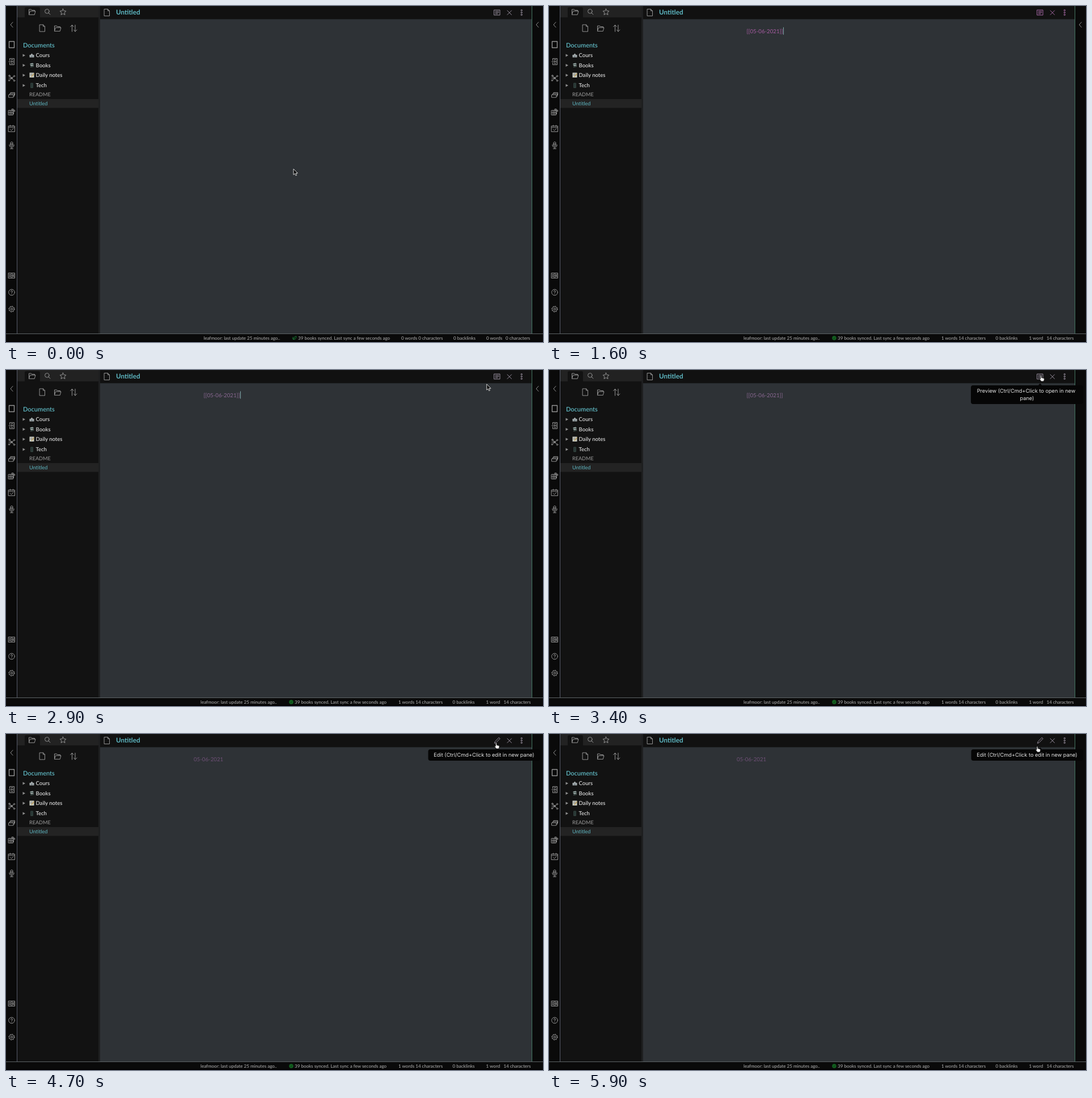
Animation, 947 px wide and 592 px high, one loop 6000 ms. Source, as an HTML page:

```html
<!DOCTYPE html>
<html lang="en">
<head>
<meta charset="utf-8">
<title>Daily note link</title>
<style>
  html, body { margin: 0; width: 100%; height: 100%; overflow: hidden; background: #0a0a0a; }
  svg { display: block; }
  text { font-family: Lato, "Open Sans", sans-serif; white-space: pre; text-rendering: geometricPrecision; }
  .icon { fill: none; stroke: #929292; stroke-width: 1; stroke-linejoin: round; stroke-linecap: round; }
  .teal { fill: #5fb9c4; }
  .folder { font-size: 9.5px; font-weight: 600; fill: #d6d6d6; }
  .file { font-size: 9.1px; }
  .status text { font-size: 8.05px; fill: #b4b4b4; }
  .tip text { font: 9.2px Inter, "Liberation Sans", sans-serif; fill: #e6e6e6; text-anchor: middle; }
  .tip { fill: #060606; }
  #note { font-size: 9.7px; }
  .row { font-size: 10.5px; }
  .hint { font-size: 8.5px; fill: #64686c; }
</style>
</head>
<body>
<svg width="947" height="592" viewBox="0 0 947 592">
  <defs>
    <path id="folder" d="M-5.5 4.5V-4.5H-1.5L-.3-3H4.5V-1.5M-5.5 4.5L-3.5-1.5H6L4.3 4.5Z"/>
    <path id="page" d="M-4.5-6H1.5L4.5-3V6H-4.5ZM1.5-6V-3H4.5"/>
    <path id="fold" d="M0-2.5L4.5 0L0 2.5Z" fill="#8d8d8d"/>
    <path id="notch" d="M862.5 27.5L866 23.5L869.5 27.5Z"/>
    <filter id="shade" x="-30%" y="-40%" width="160%" height="210%">
      <feDropShadow dx="0" dy="7" stdDeviation="7" flood-color="#000" flood-opacity=".3"/>
    </filter>
  </defs>

  <!-- panels -->
  <rect width="947" height="592" fill="#0a0a0a"/>
  <rect x="20" width="144" height="577" fill="#121212"/>
  <rect x="20" width="143" height="20" fill="#222"/>
  <path d="M33 20V5Q33 2 36 2H57Q60 2 60 5V20Z" fill="#121212"/>
  <rect x="163" width="3" height="577" fill="#1e1f20"/>
  <rect x="166" width="761" height="23" fill="#111"/>
  <rect x="166" y="23" width="761" height="554" fill="#2e3236"/>
  <rect x="166" y="23" width="761" height="1" fill="#24292b"/>
  <rect x="19" width="1" height="577" fill="#565a68"/>
  <rect x="927" width="1" height="577" fill="#437460"/>
  <rect y="577" width="947" height="1" fill="#5c6264"/>
  <rect y="590" width="947" height="2" fill="#020103"/>

  <!-- ribbons -->
  <g class="icon">
    <path d="M12 28.5L8 33L12 37.5"/>
    <rect x="5.5" y="62.5" width="9" height="11" stroke-width="1.4"/>
    <path transform="translate(10 98)" d="M-3.5-2V-5.5H4.5V5.5H-3.5V2M-5 0H1M-1-2L1 0L-1 2M-1-3.5H2.5M-1 3.5H2.5M2.5-1.5V1.5"/>
    <g transform="translate(10 127)">
      <path d="M-3.5-3.5L0 0L4-3M0 0L-4 4M0 0L4 4M0 0H-5"/>
      <circle cx="-4" cy="-4" r="1.3"/><circle cx="4.5" cy="-3.5" r="1.2"/>
      <circle cx="-4.5" cy="4" r="1.2"/><circle cx="4.5" cy="4.5" r="1.3"/><circle r="1.3"/>
    </g>
    <path d="M5 156.5H13V161H5ZM6.5 156V154.5H14.5V159H13.5M8 154V152.5H15.5V157H15"/>
    <path d="M4.5 184H12.5V192H4.5ZM4.5 188H12.5M7.2 184V192M9.9 184V192M10.5 181.5H13V183.5H10.5ZM13.5 183.5H15.5V186H13.5ZM13.5 188V190"/>
    <path d="M4.5 211.5H15.5V221.5H4.5ZM4.5 214H15.5M7.5 210V212M12.5 210V212M7.5 217.5L9.5 219.5L13 215.8"/>
    <path d="M8 240.5Q10 238 12 240.5V246Q10 248.5 8 246ZM6 244.5V246Q6.5 249 10 249T14 246V244.5M10 249V251.5M7.5 251.5H12.5M8.5 242.5H11.5M8.5 244.5H11.5"/>
    <path d="M4.5 470.5H15.5V479.5H4.5ZM6 472.5V474M6 476V477.5M14 472.5V474M14 476V477.5"/>
    <circle cx="10" cy="475" r="3"/><circle cx="10" cy="475" r="1"/>
    <circle cx="10" cy="504.5" r="5.3"/>
    <path d="M8.5 503Q8.7 501.5 10 501.5T11.5 503Q11.5 504 10 505V505.7M10 507.3V507.4"/>
    <circle cx="10" cy="534" r="4.3"/><circle cx="10" cy="534" r="1.7"/>
    <circle cx="10" cy="534" r="5.2" stroke-dasharray="1.8 2.28" stroke-linecap="butt"/>
    <path d="M939 28.5L935 33L939 37.5"/>
  </g>

  <!-- file pane -->
  <g class="icon">
    <use href="#folder" x="46" y="10.5"/>
    <circle cx="72.3" cy="9.3" r="3.7"/><path d="M75 12L78 15"/>
    <path d="M100.5 5L102.1 8.6L106 9L103.1 11.6L104 15.5L100.5 13.5L97 15.5L97.9 11.6L95 9L98.9 8.6Z"/>
    <use href="#page" x="64" y="39"/>
    <use href="#folder" x="91" y="39.5"/>
    <path d="M116.5 45V33.5M113.5 36.5L116.5 33.5L119.5 36.5M122 33.5V45M119.5 42L122 45L125 42"/>
    <use href="#page" x="178" y="11.5"/>
  </g>
  <rect x="20" y="164" width="143" height="15.5" fill="#232323"/>
  <text x="30" y="72.8" class="teal" font-size="11" font-weight="600">Documents</text>
  <g class="folder">
    <use href="#fold" x="29.5" y="87"/><text x="52.5" y="90">Cours</text>
    <use href="#fold" x="29.5" y="104.5"/><text x="52.5" y="107.6">Books</text>
    <use href="#fold" x="29.5" y="122"/><text x="52.5" y="125.3">Daily notes</text>
    <use href="#fold" x="29.5" y="140"/><text x="52.5" y="143.2">Tech</text>
  </g>
  <path d="M41.5 90.5V86H43.5L45.5 83.5L47.5 86H49.5V90.5Z" fill="#a9b0b2"/>
  <path d="M43 88H44M47 88H48M45.5 87.5V90.5" stroke="#4b5a60"/>
  <path d="M42 101.5L47 100.5L49 102L44 103ZM42.5 104L48 103.5L49 105L44 106Z" fill="#a8b5b4"/>
  <path d="M42 103.3L48.5 102.7M43 107.5L49 106.5" stroke="#567069"/>
  <rect x="41.5" y="117.5" width="8" height="8.5" fill="#c6c9bf"/>
  <path d="M43 120H47M43 122H46" stroke="#888"/><path d="M45 124.5L49.5 119" stroke="#b9974e" stroke-width="1.3"/>
  <rect x="43" y="135.5" width="5" height="9" rx="1" fill="#30413d"/>
  <path d="M44 138H47M44 141H47" stroke="#1c2526"/>
  <text x="41" y="159.2" class="file" fill="#9c9c9c">README</text>
  <text x="41" y="175.2" class="file teal">Untitled</text>
  <text x="194" y="14.8" class="teal" font-size="11.7" font-weight="700">Untitled</text>

  <!-- pane actions -->
  <g class="icon" id="actions">
    <path id="preview" d="M861 7H871V16H861ZM863 9.3H869M863 11.5H869M863 13.7H867"/>
    <path id="pencil" d="M861.5 16L862.5 13L869.3 6.3L871.2 8.2L864.5 15Z"/>
    <path d="M884 8L891.5 15.5M891.5 8L884 15.5"/>
    <circle cx="909.2" cy="7.6" r="1.2"/><circle cx="909.2" cy="11.5" r="1.2"/><circle cx="909.2" cy="15.4" r="1.2"/>
  </g>

  <!-- editor -->
  <text id="note" y="47.6"></text>
  <rect id="caret" y="37.5" width="1" height="13" fill="#83a9ae"/>
  <g id="popup">
    <rect id="box" x=".5" y="52.5" width="126" fill="#2e3236" stroke="#505558" filter="url(#shade)"/>
    <rect x="1" y="53" width="125" height="21.5" fill="#121212"/>
    <text class="row teal" x="7.5" y="66.8"></text>
    <text class="row" fill="#aaa" x="7.5" y="88.8"></text>
    <text class="row" fill="#aaa" x="7.5" y="110.8"></text>
    <text id="hint" class="hint" x="13.5"><tspan font-weight="700" fill="#85898c">Shift</tspan> Keep text as alias</text>
  </g>

  <g class="status" id="status">
    <text y="588">leafmoor: last update 25 minutes ago..</text>
    <text y="588">39 books synced. Last sync a few seconds ago</text>
    <text y="588"></text>
    <text y="588">0 backlinks</text>
    <text y="588"></text>
    <text y="588"></text>
  </g>
  <g id="sync">
    <path id="leaf" d="M-2.5 2Q-4-1-2-2M-2 2.5Q3 3.5 3.5-3Q-1-3-2 2.5L1-.5" fill="none" stroke="#16742f"/>
    <g id="disc"><circle r="3.8" fill="#12601f"/><path d="M-1.7 0L-.4 1.4L1.9-1.4" fill="none" stroke="#0a3513" stroke-width=".9"/></g>
  </g>

  <g class="tip" id="previewTip">
    <use href="#notch"/>
    <rect x="744" y="27" width="198" height="33" rx="4"/>
    <text x="841.5" y="40.3">Preview (Ctrl/Cmd+Click to open in new</text>
    <text x="843" y="53.3">pane)</text>
  </g>
  <g class="tip" id="editTip">
    <use href="#notch"/>
    <rect x="744.5" y="27" width="197.5" height="20" rx="4"/>
    <text x="843" y="40.3">Edit (Ctrl/Cmd+Click to edit in new pane)</text>
  </g>

  <g id="mouse" stroke-linejoin="round">
    <path id="arrow" d="M0 0V10.3L2.4 8.2L4 11.8L5.7 11L4.2 7.5H7.3Z" fill="#0c0c0c" stroke="#e8e8e8" stroke-width=".9"/>
    <path id="hand" d="M-1 1Q0-.6 1 1V4L5 5Q6 5.6 5.6 8L4.6 10.5H.2L-2.6 6.6Q-2.4 5.3-1 6Z" fill="#f2f2f2" stroke="#111" stroke-width=".8"/>
  </g>
</svg>
<script>
  const LOOP = 6000, STEP = 100;
  const PICK = 1600, CLICK = 3700, BLINK = 530;
  const NOTE_X = 348.5;
  const KEYS = [300, 500, 600, 700, 800, 1000];
  const DAYS = ['Today', 'Tomorrow', 'Yesterday'];
  const LINK = '[[05-06-2021]]';

  // Status layout: x of the six labels, then of the sync icon.
  const LAYOUT = {
    empty: [348.5, 515, 697, 789, 847, 881, 508.5],
    short: [352, 518, 700.5, 792, 851, 881, 512],
    long: [343, 509, 692, 787.5, 846.5, 877.5, 503]
  };
  // Pointer path: time, x, y.
  const PATH = [[0, 507, 287], [2300, 507, 287], [3000, 867.7, 9.5], [4500, 867.7, 9.5], [4900, 861, 21.5], [LOOP, 861, 21.5]];

  const $ = id => document.getElementById(id);
  const labels = [...$('status').children];
  const rows = [...document.querySelectorAll('.row')];
  const show = (id, on) => $(id).setAttribute('visibility', on ? 'visible' : 'hidden');
  const move = (id, x, y) => $(id).setAttribute('transform', `translate(${x} ${y})`);
  const within = (t, from, to) => t >= from && t < to;

  function pointerAt(t) {
    const i = PATH.findIndex(p => p[0] > t);
    const [t0, x0, y0] = PATH[i - 1], [t1, x1, y1] = PATH[i];
    const u = (t - t0) / (t1 - t0), k = u * u * (3 - 2 * u);
    return [x0 + (x1 - x0) * k, y0 + (y1 - y0) * k];
  }

  function noteColor(t) {
    if (t < PICK) return '#55acb8';
    if (t < CLICK) return t < 2900 ? '#a75ca2' : '#8a6892';
    return within(t, 4900, 5700) ? '#84487b' : '#6f5077';
  }

  function drawNote(t, typed) {
    const read = t >= CLICK, linked = t >= PICK;
    const note = $('note');
    note.textContent = read ? LINK.slice(2, -2) : linked ? LINK : '@today'.slice(0, typed);
    note.setAttribute('x', read ? 331 : NOTE_X);
    note.setAttribute('fill', noteColor(t));
    const end = Math.ceil(NOTE_X + (typed ? note.getComputedTextLength() : 0));
    $('caret').setAttribute('x', end);
    show('caret', typed && !read && (!linked || Math.floor((t - PICK) / BLINK) % 2 === 0));
    return end;
  }

  function drawPopup(x, typed, open) {
    $('popup').setAttribute('display', open ? 'inline' : 'none');
    if (!open) return;
    const query = 'today'.slice(0, typed - 1);
    const found = DAYS.filter(d => d.toLowerCase().startsWith(query));
    rows.forEach((r, i) => r.textContent = found[i] || '');
    const extra = 22 * (found.length - 1);
    $('box').setAttribute('height', 50.5 + extra);
    $('hint').setAttribute('y', 96.3 + extra);
    move('popup', x, 0);
  }

  function drawStatus(chars) {
    const xs = LAYOUT[chars > 9 ? 'long' : chars ? 'short' : 'empty'];
    const words = chars > 1 ? 1 : 0;
    labels.forEach((l, i) => l.setAttribute('x', xs[i]));
    labels[2].textContent = `${words} words ${chars} characters`;
    labels[4].textContent = words ? '1 word' : '0 words';
    labels[5].textContent = `${chars} characters`;
    move('sync', xs[6], 585);
    show('leaf', chars < 10);
    show('disc', chars > 9);
  }

  function draw(t) {
    const typed = KEYS.filter(k => k <= t).length;
    const end = drawNote(t, typed);
    drawPopup(end, typed, typed > 0 && t < PICK);
    drawStatus(t >= PICK ? LINK.length : typed);

    const read = t >= CLICK;
    show('preview', !read);
    show('pencil', read);
    $('actions').style.stroke = within(t, PICK, 2900) ? '#a165a0' : within(t, 4900, 5700) ? '#a0709a' : '#968d9c';
    show('previewTip', within(t, 3100, CLICK));
    show('editTip', within(t, CLICK, 4800) || t >= 5700);

    const hand = within(t, 3000, 4800) || t >= 5700;
    const visible = t < KEYS[0] || t >= 2300;
    move('mouse', ...pointerAt(t));
    show('arrow', visible && !hand);
    show('hand', visible && hand);
  }

  let last = -1;
  function tick() {
    const t = Math.floor(performance.now() % LOOP / STEP) * STEP;
    if (t !== last) draw(last = t);
    requestAnimationFrame(tick);
  }
  tick();
</script>
</body>
</html>
```
